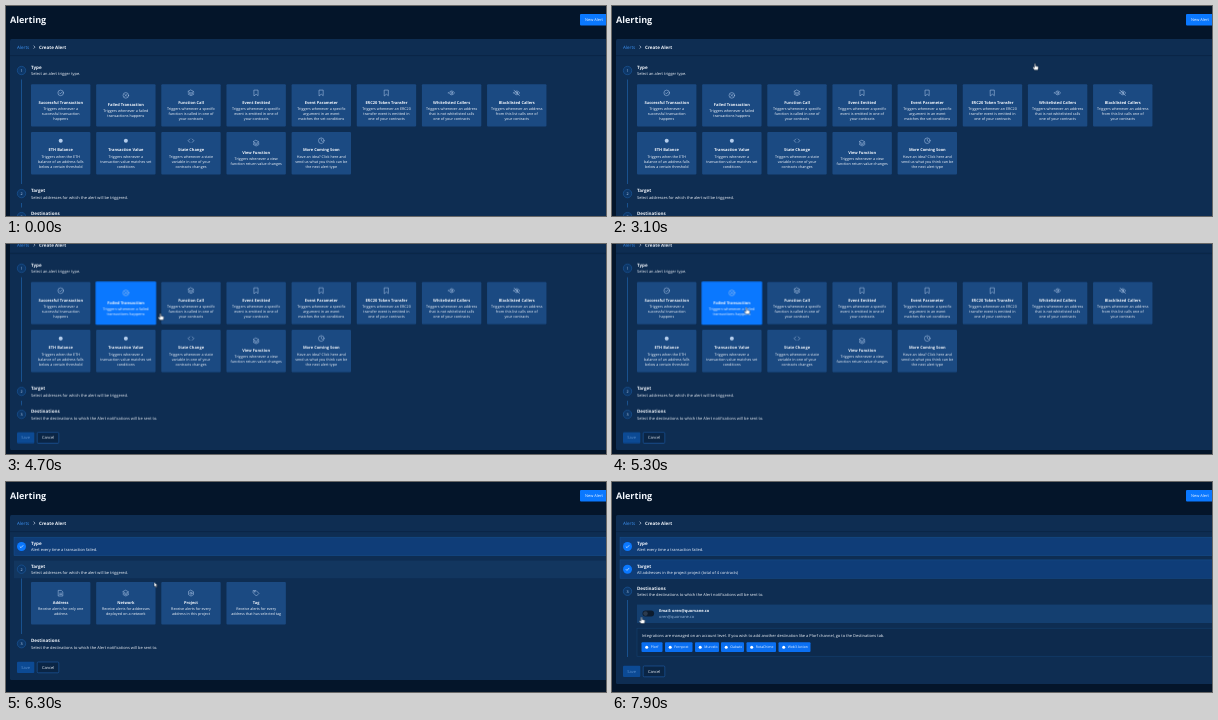
Recreate the animation shown at these times as an HTML page. Size 600 px wide and 210 px high, loop 8000 ms.

```html
<!DOCTYPE html>
<html lang="en">
<head>
<meta charset="utf-8">
<title>Create Alert</title>
<style>
html, body { margin: 0; width: 100%; height: 100%; overflow: hidden; background: #04152a; }
svg { display: block; }
text { font: 3.96px "Open Sans", "Noto Sans", sans-serif; fill: #f2f6fc; text-rendering: geometricPrecision; }
.title { font-size: 9.06px; font-weight: 700; }
.head { font-size: 4.53px; font-weight: 700; }
.bold { font-weight: 700; }
.crumb { font-size: 4.53px; fill: #3d94f6; }
.desc { font-size: 3.7px; }
.chip { font-size: 3.45px; }
.num { font-size: 3.7px; fill: #cfe2fa; }
.dim { fill: #5c92d0; }
.soft { fill: #9db9da; }
.mid { text-anchor: middle; }
.panel { fill: #0e2d52; }
.card rect { fill: #1b4a82; }
.icon { fill: none; stroke: #b4cdec; stroke-width: .5; stroke-linejoin: round; stroke-linecap: round; }
.blue { fill: #0a78ff; }
.rail { stroke: #1d5b9f; stroke-width: .8; }

#page, #types, #targets, #dests, .hot1, .hot1 rect, .hot2, .hot2 rect,
#show, #cursor, #hand, #arrow { animation: 8s linear infinite; }
#page { animation-name: scroll; }
#types { animation-name: types; }
#targets { animation-name: targets; }
#dests { animation-name: dests; }
.hot1, .hot2 { transform-box: fill-box; transform-origin: center; }
.hot1 { animation-name: grow1; }
.hot1 rect { animation-name: glow1; }
.hot2 { animation-name: grow2; }
.hot2 rect { animation-name: glow2; }
#show { animation-name: show; }
#cursor { animation-name: move; }
#hand { animation-name: hand; }
#arrow { animation-name: arrow; }
#types, #targets, #dests, #show, #hand, #arrow { animation-timing-function: step-end; }

@keyframes scroll {
  0%, 42.5% { transform: translateY(0); }
  50% { transform: translateY(-26.5px); }
  51.25% { transform: translateY(-40.3px); }
  73.74% { transform: translateY(-40.3px); }
  73.75%, 100% { transform: translateY(0); }
}
@keyframes types { 0% { visibility: visible; } 73.75%, 100% { visibility: hidden; } }
@keyframes targets { 0% { visibility: hidden; } 73.75% { visibility: visible; } 87.5%, 100% { visibility: hidden; } }
@keyframes dests { 0% { visibility: hidden; } 87.5%, 100% { visibility: visible; } }
@keyframes grow1 { 0%, 56.25% { transform: scale(1); } 58.75%, 100% { transform: scale(1.02); } }
@keyframes glow1 { 0%, 56.25% { fill: #1b4a82; } 58.75%, 100% { fill: #0a78ff; } }
@keyframes grow2 { 0%, 80% { transform: scale(1); } 82.5%, 100% { transform: scale(1.02); } }
@keyframes glow2 { 0%, 80% { fill: #1b4a82; } 82.5%, 100% { fill: #0a78ff; } }
@keyframes show { 0% { opacity: 0; } 30%, 100% { opacity: 1; } }
@keyframes hand {
  0% { opacity: 1; } 41.25% { opacity: 0; } 56.25% { opacity: 1; } 75% { opacity: 0; }
  81.25% { opacity: 1; } 88.75% { opacity: 0; } 96.25%, 100% { opacity: 1; }
}
@keyframes arrow {
  0% { opacity: 0; } 41.25% { opacity: 1; } 56.25% { opacity: 0; } 75% { opacity: 1; }
  81.25% { opacity: 0; } 88.75% { opacity: 1; } 96.25%, 100% { opacity: 0; }
}
@keyframes move {
  0%, 30% { transform: translate(600px, 19px); }
  38.75%, 40% { transform: translate(423px, 57.5px); }
  50%, 51.25% { transform: translate(482.5px, 51.5px); }
  58.75% { transform: translate(154.5px, 69.5px); }
  61.25%, 73.75% { transform: translate(134.5px, 63.5px); }
  78.75% { transform: translate(148px, 100px); }
  81.25%, 88.75% { transform: translate(184px, 119px); }
  96.25% { transform: translate(48px, 136px); }
  98.75%, 100% { transform: translate(29.5px, 135px); }
}
</style>
</head>
<body>
<svg id="stage" width="600" height="210" viewBox="0 0 600 210"></svg>
<script>
const icons = {
  check: '<circle r="2.8"/><path d="M-1.2 0l.9.9 1.6-1.7"/>',
  cross: '<circle r="2.8"/><path d="M-1-1l2 2m0-2l-2 2"/>',
  layers: '<path d="M0-2.8l2.8 1.5L0 .2l-2.8-1.5zM-2.8 0L0 1.5 2.8 0M-2.8 1.3L0 2.8l2.8-1.5"/>',
  mark: '<path d="M-1.9-2.8h3.8v5.6L0 1.3l-1.9 1.5z"/>',
  eye: '<path d="M-3 0Q0-4 3 0Q0 4-3 0z"/><circle r=".9"/>',
  eyeOff: '<path d="M-3 0Q0-4 3 0Q0 4-3 0zM-2.7-2.7l5.4 5.4"/><circle r=".9"/>',
  dot: '<circle r="2" fill="#b4cdec" stroke="none"/>',
  code: '<path d="M-1.2-1.7l-1.7 1.7 1.7 1.7M1.2-1.7l1.7 1.7-1.7 1.7"/>',
  clock: '<circle r="2.8"/><path d="M0-1.7V0l1.2.7"/>',
  file: '<path d="M-2.1-2.8h2.7l1.5 1.5v4.1h-4.2zM-1 0h2M-1 1.3h2"/>',
  gear: '<path d="M0-2.9l2.5 1.45v2.9L0 2.9l-2.5-1.45v-2.9z"/><circle r="1.1"/>',
  tag: '<path d="M-2.7-2.7h2.6l2.9 2.9-2.6 2.6-2.9-2.9z"/><circle cx="-1.4" cy="-1.4" r=".3"/>'
};

const typeCards = [
  ['check', 'Successful Transaction', 'Triggers whenever a|successful transaction|happens'],
  ['cross', 'Failed Transaction', 'Triggers whenever a failed|transactions happens', 'hot1'],
  ['layers', 'Function Call', 'Triggers whenever a specific|function is called in one of|your contracts'],
  ['mark', 'Event Emitted', 'Triggers whenever a specific|event is emitted in one of|your contracts'],
  ['mark', 'Event Parameter', 'Triggers whenever a specific|argument in an event|matches the set conditions'],
  ['mark', 'ERC20 Token Transfer', 'Triggers whenever an ERC20|transfer event is emitted in|one of your contracts'],
  ['eye', 'Whitelisted Callers', 'Triggers whenever an address|that is not whitelisted calls|one of your contracts'],
  ['eyeOff', 'Blacklisted Callers', 'Triggers whenever an address|from this list calls one of|your contracts'],
  ['dot', 'ETH Balance', 'Triggers when the ETH|balance of an address falls|below a certain threshold'],
  ['dot', 'Transaction Value', 'Triggers whenever a|transaction value matches set|conditions'],
  ['code', 'State Change', 'Triggers whenever a state|variable in one of your|contracts changes'],
  ['layers', 'View Function', 'Triggers whenever a view|function return value changes'],
  ['clock', 'More Coming Soon', 'Have an idea? Click here and|send us what you think can be|the next alert type']
];
const targetCards = [
  ['file', 'Address', 'Receive alerts for only one|address'],
  ['layers', 'Network', 'Receive alerts for addresses|deployed on a network'],
  ['gear', 'Project', 'Receive alerts for every|address in this project', 'hot2'],
  ['tag', 'Tag', 'Receive alerts for every|address that has selected tag']
];
const chips = [['Plorf', 29.5, 21], ['Fernpost', 53, 27.5], ['Murvelo', 83, 24],
  ['Oakwix', 109, 23], ['RotaChime', 134.5, 29.5], ['Web3 Action', 166.5, 32]];
const mail = 'oren@quorvane.co';

const text = (x, y, str, cls = '') => `<text x="${x}" y="${y}" class="${cls}">${str}</text>`;
const rect = (x, y, w, h, attrs = '') => `<rect x="${x}" y="${y}" width="${w}" height="${h}" ${attrs}/>`;
const rail = (y1, y2) => `<path class="rail" d="M15.5 ${y1}V${y2}"/>`;
const panel = bottom => rect(4, 33, 600, bottom - 33, 'class="panel" rx="1.5"');

function card([icon, name, lines, cls = ''], x, y) {
  const rows = lines.split('|');
  const mid = y + 21.2 + (rows.length < 3 ? 2.5 : 0);
  const cx = x + 29.7;
  return `<g class="card ${cls}">` + rect(x, y, 59.4, 42.4, 'rx="1"') +
    `<g class="icon" transform="translate(${cx} ${mid - 12.5})">${icons[icon]}</g>` +
    text(cx, mid - 1.8, name, 'bold mid') +
    rows.map((row, i) => text(cx, mid + 4.4 + 5.1 * i, row, 'desc mid')).join('') + '</g>';
}

const grid = (list, y) => list.map((c, i) =>
  card(c, 25 + 65.15 * (i % 8), y + 47.8 * Math.floor(i / 8))).join('');

function step(n, y, head, note, done) {
  const badge = done
    ? rect(8, y - 9.3, 600, 18.4, 'fill="#0f3d78" stroke="#16508f" stroke-width=".5"') +
      `<circle cx="15.5" cy="${y}" r="4.5" class="blue"/>
       <path d="M13.8 ${y}l1.2 1.2 2.2-2.4" fill="none" stroke="#fff" stroke-width=".6"/>`
    : `<circle cx="15.5" cy="${y}" r="4.2" fill="#0d3768" stroke="#1d5b9f" stroke-width=".6"/>` +
      text(15.5, y + 1.35, n, 'num mid');
  return badge + text(25, y - 1.7, head, 'head') + text(25, y + 4.9, note);
}

const buttons = y =>
  rect(11, y - 5.6, 17.3, 11.2, 'rx="1" fill="#0c4a94"') + text(19.6, y + 1.4, 'Save', 'mid dim') +
  rect(31.2, y - 5.4, 21.6, 10.8, 'rx="1" fill="#0a2545" stroke="#2367b8" stroke-width=".5"') +
  text(42, y + 1.4, 'Cancel', 'mid');

const chip = ([name, x, w]) => rect(x, 160.3, w, 9.8, 'rx="1" fill="#0a6ff2"') +
  `<circle cx="${x + 5.2}" cy="165.2" r="1.5" fill="#fff"/>` + text(x + 9.3, 166.4, name, 'chip');

const typeDone = step(1, 64.5, 'Type', 'Alert every time a transaction failed.', true);
const targetNote = 'Select addresses for which the alert will be triggered.';
const destNote = 'Select the destinations to which the Alert notifications will be sent to.';

const views = {
  types: panel(246) + rail(73.5, 178) + rail(197, 201.5) +
    step(1, 64.5, 'Type', 'Select an alert trigger type.') + grid(typeCards, 78.2) +
    step(2, 187.6, 'Target', targetNote) + step(3, 210.6, 'Destinations', destNote) + buttons(234),
  targets: panel(198) + typeDone + rect(8, 78.6, 600, 17.6, 'fill="#12365f"') + rail(96.5, 152) +
    step(2, 87.2, 'Target', targetNote) + grid(targetCards, 100) +
    step(3, 161.7, 'Destinations', destNote) + buttons(185.4),
  dests: panel(202) + typeDone +
    step(2, 87.2, 'Target', 'All addresses in the project project (total of 4 contracts)', true) +
    rail(118, 175) + step(3, 109.3, 'Destinations', destNote) +
    rect(25, 122.6, 580, 18.4, 'fill="#143f70"') +
    rect(30.5, 128.6, 11.6, 6, 'rx="3" fill="#0d1c2e"') + '<circle cx="33.5" cy="131.6" r="2.3" fill="#2c3b4e"/>' +
    text(47, 130.2, 'Email: ' + mail, 'bold') + text(47, 136, mail, 'soft') +
    rect(25, 146.2, 580, 28, 'fill="#0d2a4d" stroke="#164374" stroke-width=".5"') +
    text(29.8, 154.6, 'Integrations are managed on an account level. If you wish to add another destination like a Plorf channel, go to the Destinations tab.') +
    chips.map(chip).join('') + buttons(189.4)
};

const header = text(4, 17.2, 'Alerting', 'title') +
  rect(574, 8, 30, 11.4, 'rx="1" class="blue"') + text(588, 15.1, 'New Alert', 'mid');
const crumbs = text(11, 42.7, 'Alerts', 'crumb') +
  '<path d="M27.6 39.6l1.4 1.5-1.4 1.5" fill="none" stroke="#dfeafa" stroke-width=".6"/>' +
  text(33, 42.7, 'Create Alert', 'head') +
  '<path d="M4 49.6H600" stroke="#0a2342" stroke-width=".7"/>';

const cursor = `<g id="show"><g id="cursor" fill="#fff" stroke="#0a1526" stroke-width=".4">
  <path id="hand" d="M-.6.5Q0-.4.6.5V2.6L2.8 3.1Q3.6 3.4 3.4 4.3L2.9 6.6H-.5L-2.2 4.2Q-2.3 3.3-1.4 3.5L-.6 4.2z"/>
  <path id="arrow" d="M0 0V4.8L1.1 3.8 1.9 5.5 2.7 5.1 2 3.5H3.5z"/></g></g>`;

document.getElementById('stage').innerHTML = '<g id="page">' + header +
  Object.entries(views).map(([id, body]) => `<g id="${id}">${body}</g>`).join('') +
  crumbs + '</g>' + cursor;
</script>
</body>
</html>
```
